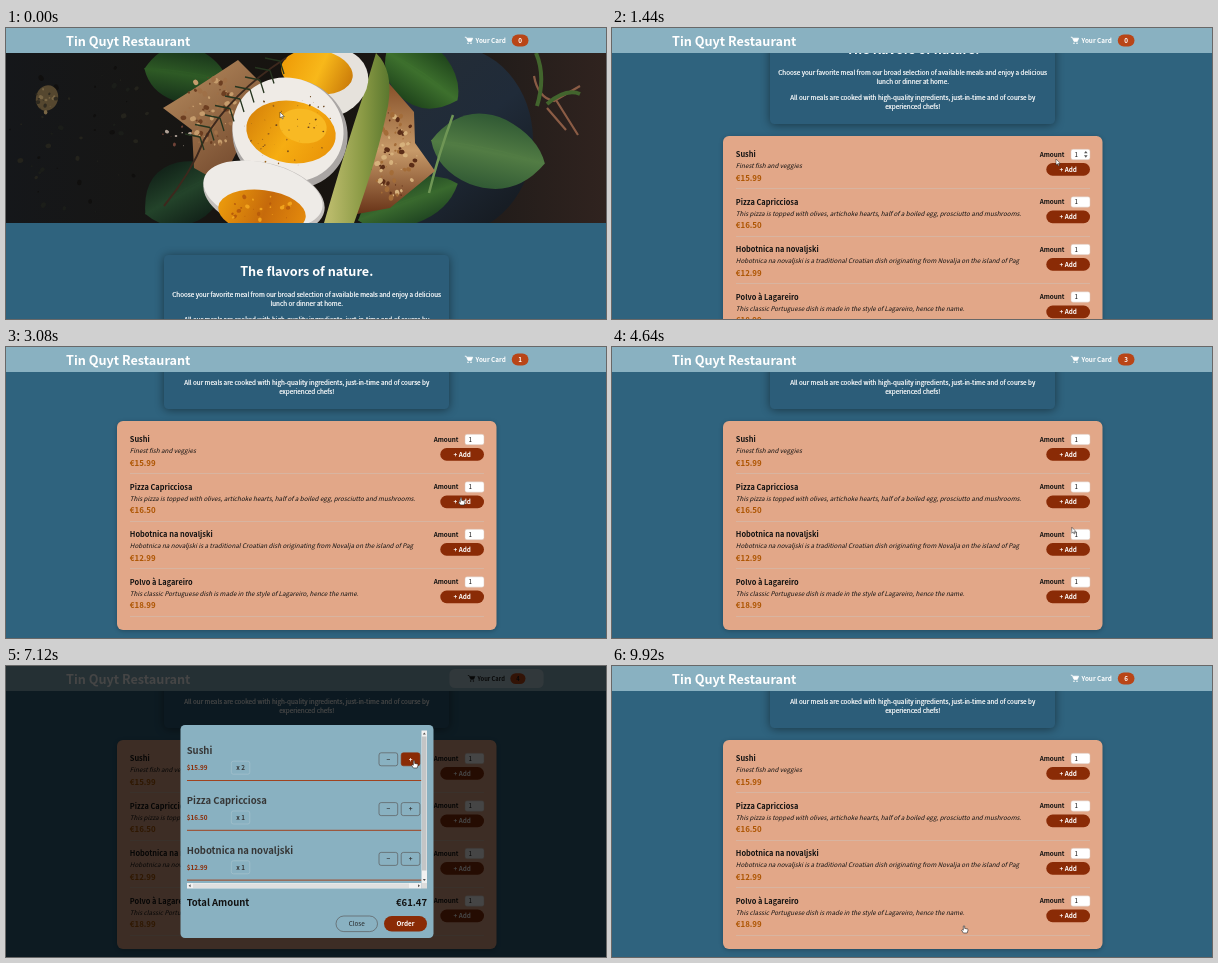
Write an HTML page with a canvas that moves like this. It is 600 by 291 pixels and loops after 9.96 s.

```html
<!DOCTYPE html>
<html lang="en">
<head>
<meta charset="utf-8">
<title>Restaurant order</title>
<style>
  html, body { margin: 0; width: 100%; height: 100%; overflow: hidden; background: #2f637e; }
  canvas { display: block; }
</style>
</head>
<body>
<canvas id="stage" width="600" height="291"></canvas>
<script>
const W = 600, H = 291, LOOP = 9960;
const FONT = '"Noto Sans CJK JP", "Noto Sans CJK SC", "Noto Sans CJK", "Noto Sans", sans-serif';
const BASE = 6.33, H1 = BASE * 2, H2 = BASE * 1.5, H3 = BASE * 1.17;
const BROWN = '#8a2b06', HEADER = '#89b1c1', WHITE = '#fff', PRICE = '#ad5502';

const stage = document.getElementById('stage').getContext('2d');
const sheet = document.createElement('canvas');
sheet.width = W;
sheet.height = H;
const layer = sheet.getContext('2d');
let g = stage;

const meals = [
  ['Sushi', 'Finest fish and veggies', '15.99'],
  ['Pizza Capricciosa', 'This pizza is topped with olives, artichoke hearts, half of a boiled egg, prosciutto and mushrooms.', '16.50'],
  ['Hobotnica na novaljski', 'Hobotnica na novaljski is a traditional Croatian dish originating from Novalja on the island of Pag', '12.99'],
  ['Polvo à Lagareiro', 'This classic Portuguese dish is made in the style of Lagareiro, hence the name.', '18.99']
];

// Timeline
const adds = [2120, 3240, 4160, 7090, 7360, 7660];
const OPEN = 5616, CLOSE = 9400;
const scrollKeys = [[0, 0], [100, 0], [560, 175], [760, 175], [1160, 222], [2420, 222], [2700, 256]];
const cursorKeys = [
  [0, 274, 84], [960, 274, 85], [1340, 468, 126], [1440, 444, 131], [1640, 455, 140],
  [2460, 455, 140], [2860, 455, 151], [3500, 455, 151], [3900, 456, 200], [4500, 456, 200],
  [5200, 492, 12], [5840, 492, 12], [6500, 408, 95], [8200, 408, 95], [8800, 352, 260]
];
const handTimes = [[1560, 3560], [3840, 4560], [5100, OPEN], [6420, 8260], [8700, LOOP]];

const smooth = p => p * p * (3 - 2 * p);
const within = (t, a, b) => t >= a && t < b;

function track(keys, t, column) {
  const next = keys.findIndex(k => k[0] > t);
  if (next < 0) return keys[keys.length - 1][column];
  const a = keys[next - 1], b = keys[next];
  return a[column] + (b[column] - a[column]) * smooth((t - a[0]) / (b[0] - a[0]));
}

// Solves the CSS ease-out curve, cubic-bezier(0, 0, .58, 1)
function easeOut(x) {
  let lo = 0, hi = 1;
  for (let i = 0; i < 20; i++) {
    const s = (lo + hi) / 2;
    if (1.74 * s * s * (1 - s) + s * s * s < x) lo = s; else hi = s;
  }
  return smooth(lo);
}

function bumpScale(p) {
  const keys = [[0, 1], [.1, .9], [.3, 1.1], [.5, 1.15], [1, 1]];
  const i = keys.findIndex(k => k[0] > p);
  const [a, from] = keys[i - 1], [b, to] = keys[i];
  return from + (to - from) * easeOut((p - a) / (b - a));
}

// Drawing helpers
function text(str, x, y, size, color, { style = '', align = 'left', heft = 0 } = {}) {
  g.font = `${style} ${size}px ${FONT}`;
  g.textAlign = align;
  g.fillStyle = g.strokeStyle = color;
  g.fillText(str, x, y + size * .365);
  if (heft) {
    g.lineWidth = heft;
    g.strokeText(str, x, y + size * .365);
  }
}

function box(x, y, w, h, r, fill, stroke, line = .6) {
  g.beginPath();
  g.roundRect(x, y, w, h, r);
  if (fill) { g.fillStyle = fill; g.fill(); }
  if (stroke) { g.strokeStyle = stroke; g.lineWidth = line; g.stroke(); }
}

function rect(x, y, w, h, fill) {
  g.fillStyle = fill;
  g.fillRect(x, y, w, h);
}

function oval(x, y, rx, ry, turn, fill) {
  g.beginPath();
  g.ellipse(x, y, rx, ry, turn, 0, Math.PI * 2);
  g.fillStyle = fill;
  g.fill();
}

function shape(points, fill, stroke, line = 1) {
  const path = new Path2D(`M${points}`);
  if (fill) { g.fillStyle = fill; g.fill(path); }
  if (stroke) { g.strokeStyle = stroke; g.lineWidth = line; g.stroke(path); }
}

function gradient(x0, y0, x1, y1, ...colors) {
  const fill = g.createLinearGradient(x0, y0, x1, y1);
  colors.forEach((c, i) => fill.addColorStop(i / (colors.length - 1), c));
  return fill;
}

function speckle(x, y, rx, ry, count, size, ...colors) {
  for (let i = 0; i < count; i++) {
    const a = i * 2.4 + Math.sin(i * 7), r = Math.sqrt(i / count);
    const dot = size * (.6 + .4 * Math.sin(i * 5));
    oval(x + rx * r * Math.cos(a), y + ry * r * Math.sin(a), dot, dot * .8, a, colors[i % colors.length]);
  }
}

function leaf(x, y, rx, ry, turn, dark, light) {
  g.save();
  g.translate(x, y);
  g.rotate(turn);
  shape(`${-rx} 0Q${-rx * .6} ${-ry * 1.3} ${rx * .2} ${-ry}Q${rx * .8} ${-ry * .7} ${rx} 0Q${rx * .6} ${ry * 1.2} ${-rx * .2} ${ry}Q${-rx * .8} ${ry * .8} ${-rx} 0`,
    gradient(0, -ry, 0, ry, dark, light, dark));
  shape(`${-rx} 0Q0 ${-ry * .2} ${rx * .9} 0`, null, light, 1.2);
  g.restore();
}

function pill(label, x, y, w, h, fill, color, stroke, style = 'bold') {
  box(x, y, w, h, h / 2, fill, stroke);
  text(label, x + w / 2, y + h / 2, BASE, color, { style, align: 'center' });
}

// Page
function hero() {
  g.save();
  g.beginPath();
  g.rect(0, 25, W, 170);
  g.clip();
  rect(0, 25, W, 170, gradient(0, 0, W, 0, '#15171a', '#171614', '#17130f', '#1d1a18', '#30231f'));
  speckle(75, 110, 75, 80, 45, 3, '#24231c', '#1b1d19', '#100f0e');
  oval(41, 70, 11, 13, .3, '#55472f');
  speckle(40, 72, 11, 13, 16, 2.5, '#796645', '#302b20');
  speckle(170, 108, 15, 15, 9, 2.2, '#b0a297', '#6f4237');
  oval(445, 112, 82, 94, 0, gradient(400, 25, 525, 180, '#242d36', '#202b39', '#151a20'));

  leaf(180, 47, 42, 27, .15, '#17321a', '#2e5a25');
  leaf(178, 165, 44, 30, -.5, '#13251a', '#23432a');
  leaf(416, 48, 43, 29, .6, '#20461c', '#3d702d');
  leaf(482, 124, 58, 35, .2, '#325b35', '#527c44');
  leaf(402, 174, 53, 22, -.35, '#214722', '#39692e');
  shape('423 165Q433 125 447 87', null, '#6f9655', 2.5);

  shape('157 80Q187 62 232 32L262 62L215 155L188 140L186 102Z', gradient(160, 50, 240, 150, '#b2875b', '#70462b'));
  speckle(207, 83, 32, 35, 75, 3, '#c59c6c', '#6c3e21', '#9f7047');
  shape('380 52L408 84L409 115L429 143L384 180L340 188Z', gradient(380, 60, 380, 185, '#8a552d', '#c79a69', '#6a3519'));
  speckle(386, 126, 25, 46, 85, 3, '#d6b17c', '#5b2d17', '#a36c38');
  shape('370 25Q388 42 382 78Q372 128 348 195L318 195Q339 122 357 68Z', gradient(325, 0, 390, 0, '#b8b969', '#899944', '#4f6f29'));

  oval(322, 55, 41, 34, -.35, '#e6e2dc');
  oval(311, 44, 36, 22, .15, gradient(280, 30, 345, 60, '#ef9d08', '#f8b81a', '#c97908'));
  oval(284, 106, 58, 55, .35, '#aaa6a4');
  oval(282, 102, 56, 52, .35, '#efebe6');
  oval(285, 104, 45, 31, .15, gradient(245, 80, 325, 130, '#d78309', '#f6ad12', '#e99308'));
  oval(297, 98, 24, 17, .2, '#f8b923');
  speckle(283, 102, 47, 38, 45, 1.1, '#69431c', '#9b621a');
  oval(258, 169, 62, 34, .25, '#c4c0bd');
  oval(257, 166, 61, 31, .25, '#eeebe7');
  oval(256, 184, 44, 22, .12, gradient(220, 165, 300, 195, '#e9970c', '#c66a0b', '#e58b0c'));
  speckle(255, 181, 37, 14, 24, 2.5, '#f1a31d', '#b85c0b');

  shape('280 30Q225 65 198 112Q185 145 158 178', null, '#3d281d', 2);
  for (let i = 0; i < 9; i++) {
    const x = 274 - i * 10, y = 33 + i * 9.5;
    shape(`${x} ${y}l-15 -3M${x} ${y}l4 13`, null, '#26351f', 1.3);
  }
  shape('528 48Q532 70 548 73L574 58M550 72L572 107M541 80L560 102', null, '#8b5c45', 2.2);
  shape('530 25Q540 48 531 78M541 76Q560 60 574 66', null, '#42652d', 4);
  g.restore();
}

function summary() {
  g.save();
  g.shadowColor = 'rgba(0,0,0,.45)';
  g.shadowBlur = 10;
  g.shadowOffsetY = 1;
  box(158, 227, 285, 91, 4.5, '#2c5d79');
  g.restore();
  const line = (str, y) => text(str, 300.7, y, BASE, WHITE, { align: 'center', heft: .22 });
  text('The flavors of nature.', 300.7, 243, H1, WHITE, { style: 'bold', align: 'center' });
  line('Choose your favorite meal from our broad selection of available meals and enjoy a delicious', 266.6);
  line('lunch or dinner at home.', 275.8);
  line('All our meals are cooked with high-quality ingredients, just-in-time and of course by', 291.2);
  line('experienced chefs!', 300.4);
}

function mealList(t) {
  g.save();
  g.shadowColor = 'rgba(0,0,0,.25)';
  g.shadowBlur = 4;
  g.shadowOffsetY = 1;
  box(111, 330, 379.5, 209, 6, '#e2a788');
  g.restore();
  meals.forEach(([name, about, price], i) => {
    const y = 348.3 + i * 47.5;
    text(name, 123.8, y, H3, '#111', { style: 'bold' });
    text(about, 123.8, y + 11.7, BASE, '#111', { style: 'italic' });
    text('€' + price, 123.8, y + 23.6, BASE * 1.25, PRICE, { style: 'bold' });
    text('Amount', 452.5, y, BASE, '#111', { style: 'bold', align: 'right' });
    box(459, y - 5, 19, 10.4, 2, WHITE, '#d9c4b8', .5);
    text('1', 462.5, y + .2, BASE, '#111');
    if (i === 0 && within(t, 1300, 1480)) {
      shape(`472 ${y - 1}l1.8 -2.4l1.8 2.4ZM472 ${y + 1}l1.8 2.4l1.8 -2.4Z`, '#555');
    }
    pill('+ Add', 434.3, y + 8.8, 43.7, 12.6, BROWN, WHITE);
    rect(124, y + 34.2, 354, .5, '#ccc0b6');
  });
}

function cartButton(t, count) {
  const bump = adds.find(a => within(t, a, a + 300));
  const ink = bump ? '#1d1d1d' : WHITE;
  g.save();
  if (bump) {
    const s = bumpScale((t - bump) / 300);
    g.translate(490.5, 12.5);
    g.scale(s, s);
    g.translate(-490.5, -12.5);
    box(438.5, 2, 104, 21, 6, '#b5cfda');
  }
  shape('458.8 9.2h1.4l1.8 4.2h3.3l1.4 -3.2h-5.6', ink, ink, .7);
  oval(462, 15.2, .8, .8, 0, ink);
  oval(465, 15.2, .8, .8, 0, ink);
  text('Your Card', 469.6, 12.6, BASE, ink, { style: 'bold' });
  pill(String(count), 505.8, 6.6, 16.7, 12, '#b94517', ink);
  g.restore();
}

function header(t, count) {
  rect(0, 0, W, 25, HEADER);
  text('Tin Quyt Restaurant', 60, 13, H1, WHITE, { style: 'bold' });
  cartButton(t, count);
}

// Cart dialog
function scrollbars() {
  rect(415.5, 64.5, 5.5, 152.5, '#f1f1f1');
  rect(416, 70.5, 4.5, 134, '#c3c5c6');
  shape('416.8 68.6l1.5 -2l1.5 2ZM416.8 213l1.5 2l1.5 -2Z', '#555');
  rect(181, 217, 234.5, 5.5, '#f1f1f1');
  rect(187, 217.5, 216, 4.5, '#dedfdf');
  shape('184.6 218.3l-2 1.5l2 1.5ZM412 218.3l2 1.5l-2 1.5Z', '#555');
  rect(415.5, 217, 5.5, 5.5, '#dcdcdc');
}

function dialog(t, count) {
  const amounts = [count - 2, 1, 1];
  const total = amounts.reduce((sum, n, i) => sum + n * meals[i][2], 0);
  box(174.5, 59, 253, 213, 4.5, HEADER);
  amounts.forEach((n, i) => {
    const y = 85 + i * 49.8;
    const hover = i === 0 && within(t, 6440, 8260);
    text(meals[i][0], 180.7, y, H2, '#363636', { style: 'bold' });
    text('$' + meals[i][2], 180.7, y + 16.7, BASE, BROWN, { style: 'bold' });
    box(225.3, y + 10.2, 18.5, 13, 2, null, '#a9c4cf', .6);
    text('x ' + n, 234.5, y + 16.7, BASE, '#363636', { style: 'bold', align: 'center' });
    box(373, y + 1.8, 18.7, 13, 2.2, null, '#554d4c');
    text('−', 382.3, y + 8.3, BASE, '#363636', { style: 'bold', align: 'center' });
    box(395.2, y + 1.8, 18.7, 13, 2.2, hover ? BROWN : null, hover ? BROWN : '#554d4c');
    text('+', 404.5, y + 8.3, BASE, hover ? WHITE : '#363636', { style: 'bold', align: 'center' });
    rect(181, y + 29, 234.5, 1, '#a0431f');
  });
  scrollbars();
  text('Total Amount', 180.7, 236.8, H2, '#111', { style: 'bold' });
  text('€' + total.toFixed(2), 421, 236.8, H2, '#111', { style: 'bold', align: 'right' });
  const leaving = t > 8700;
  pill('Close', 330, 250, 41.5, 15.6, leaving ? '#5a1a01' : null, leaving ? WHITE : '#222', leaving ? '#5a1a01' : '#554d4c', '');
  pill('Order', 378, 250, 43, 15.6, BROWN, WHITE);
}

function overlay(t, count) {
  rect(0, 0, W, H, 'rgba(0,0,0,.73)');
  const p = easeOut(Math.min(1, (t - OPEN) / 300));
  g = layer;
  g.clearRect(0, 0, W, H);
  dialog(t, count);
  g = stage;
  g.globalAlpha = p;
  g.drawImage(sheet, 0, -3 * BASE * (1 - p));
  g.globalAlpha = 1;
}

function cursor(t) {
  g.save();
  g.translate(track(cursorKeys, t, 1), track(cursorKeys, t, 2));
  g.lineJoin = 'round';
  if (handTimes.some(([a, b]) => within(t, a, b))) {
    shape('-.7 0Q0 -.8 .7 0V2.4L3.6 3Q4.2 3.2 4 4.2L3.2 7H-.6L-2.4 4.3Q-2 3.3 -.7 4.2Z', WHITE, '#222', .6);
  } else {
    shape('0 0V6L1.4 4.8L2.3 6.8L3.2 6.4L2.4 4.5H4.3Z', WHITE, '#222', .5);
  }
  g.restore();
}

function draw(t) {
  const count = adds.filter(a => t >= a).length;
  rect(0, 0, W, H, '#2f637e');
  g.save();
  g.translate(0, -track(scrollKeys, t, 1));
  hero();
  summary();
  mealList(t);
  g.restore();
  header(t, count);
  if (within(t, OPEN, CLOSE)) overlay(t, count);
  cursor(t);
}

const start = performance.now();
function tick() {
  draw((performance.now() - start) % LOOP);
  requestAnimationFrame(tick);
}
tick();
</script>
</body>
</html>
```
